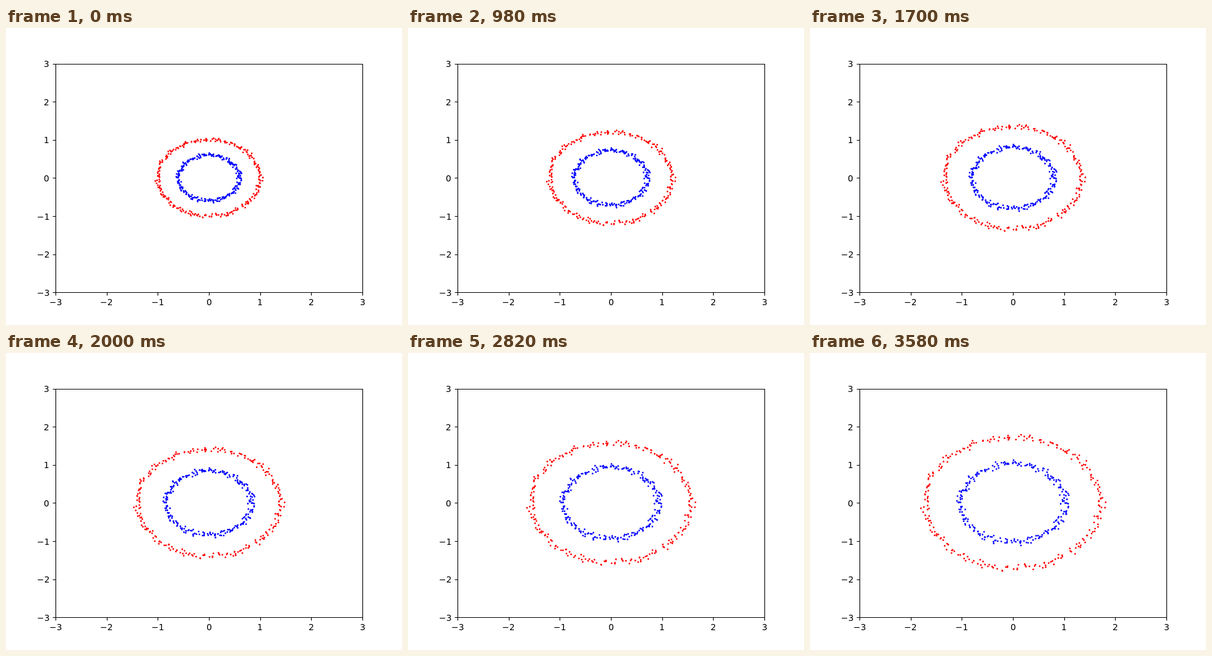
Recreate the animation shown at these times as an HTML page. Size 640x480 px, loop 3600 ms.

```html
<!DOCTYPE html>
<html lang="en">
<head>
<meta charset="utf-8">
<title>Growing rings</title>
<style>
  html, body { margin: 0; width: 100%; height: 100%; overflow: hidden; background: #fff; }
  svg { display: block; }
  text { font: 13.89px "DejaVu Sans", sans-serif; }
  .axes { fill: none; stroke: #000; stroke-width: 1.11; }
  .dots { fill: none; stroke-width: 2.8; stroke-linecap: round; }
</style>
</head>
<body>
<svg id="stage" width="640" height="480" viewBox="0 0 640 480"></svg>
<script>
const FRAME_MS = 20, FRAMES = 180, GROWTH = 0.004;
const CX = 328, CY = 242.4, UNIT_X = 496 / 6, UNIT_Y = 369.6 / 6;
const COUNT = 250, NOISE = 0.028;
const stage = document.getElementById('stage');

function add(name, attrs, text = '') {
  const el = document.createElementNS('http://www.w3.org/2000/svg', name);
  for (const key in attrs) el.setAttribute(key, attrs[key]);
  el.textContent = text;
  return stage.appendChild(el);
}

let seed = 7;
function random() {
  seed = (seed * 16807) % 2147483647;
  return seed / 2147483647;
}

// Bell-shaped spread, kept within two deviations
function jitter() {
  const n = Math.sqrt(-2 * Math.log(random())) * Math.cos(2 * Math.PI * random());
  return NOISE * Math.max(-2, Math.min(2, n));
}

function makeRing(radius, color) {
  const points = Array.from({ length: COUNT }, (_, i) => {
    const angle = 2 * Math.PI * i / COUNT;
    const r = radius + jitter(), along = jitter();
    const cos = Math.cos(angle), sin = Math.sin(angle);
    return [r * cos - along * sin, r * sin + along * cos];
  });
  return { points, path: add('path', { class: 'dots', stroke: color }) };
}

function drawAxes() {
  const snap = v => Math.round(v) + 0.5;
  let d = 'M80.5 58.5H576.5V427.5H80.5Z';
  for (let v = -3; v <= 3; v++) {
    const x = CX + v * UNIT_X, y = CY - v * UNIT_Y;
    const label = String(v).replace('-', '\u2212');
    const width = v < 0 ? 20.48 : 8.84;
    d += `M${snap(x)} 427.5v4.9M80.5 ${snap(y)}h-4.9`;
    // Labels start on whole pixels
    add('text', { x: Math.round(x - width / 2), y: 448 }, label);
    add('text', { x: Math.round(70.3 - width), y: Math.ceil(y + 5.1) }, label);
  }
  add('path', { class: 'axes', d });
}

const rings = [makeRing(1, '#f00'), makeRing(0.6, '#00f')];
drawAxes();

function draw() {
  const frame = Math.floor(performance.now() / FRAME_MS) % FRAMES;
  const scale = 1 + GROWTH * frame;
  for (const { points, path } of rings) {
    path.setAttribute('d', points.map(([x, y]) =>
      `M${(CX + x * scale * UNIT_X).toFixed(2)} ${(CY - y * scale * UNIT_Y).toFixed(2)}h0`).join(''));
  }
  requestAnimationFrame(draw);
}
draw();
</script>
</body>
</html>
```
